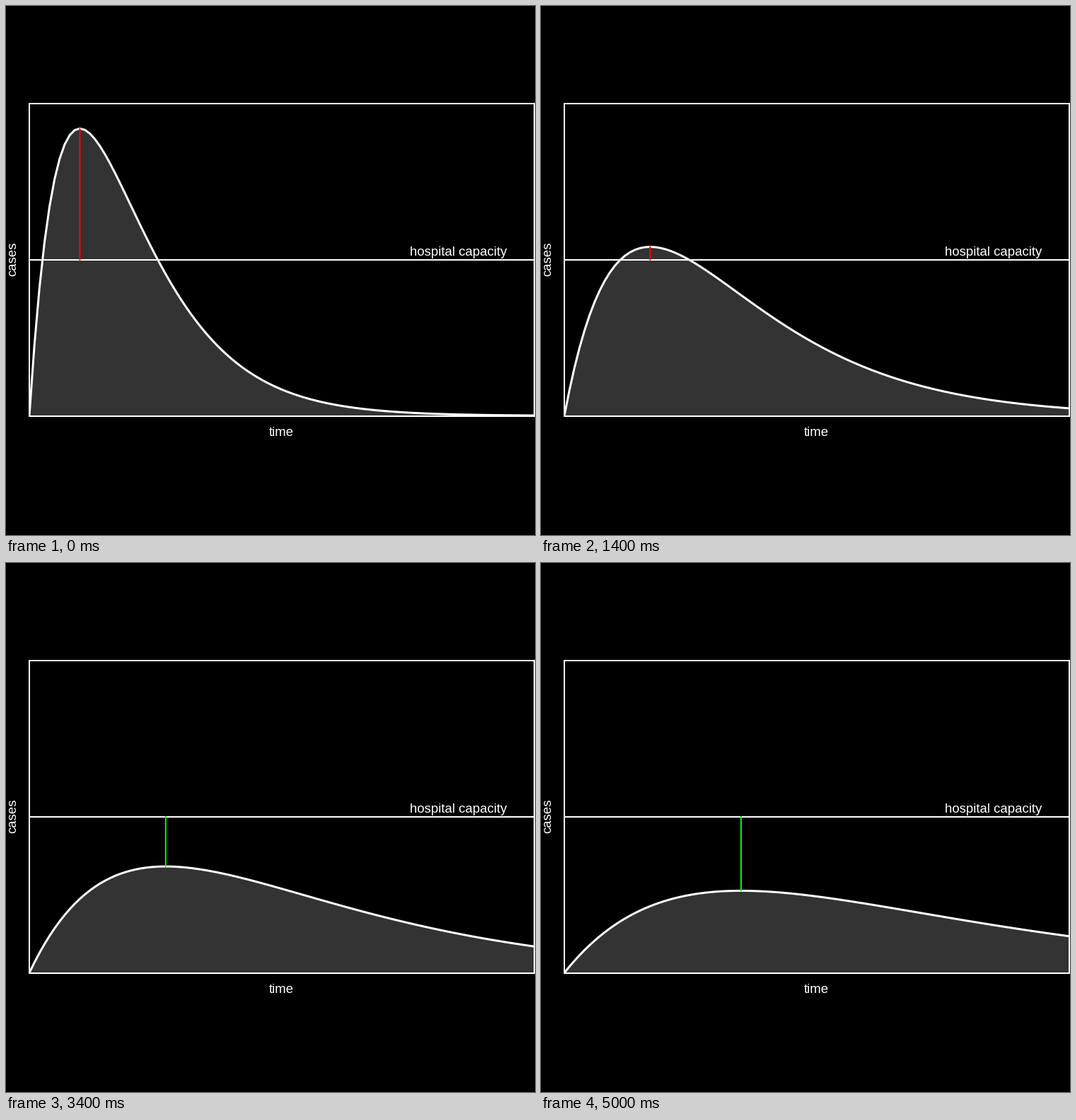
Animation of 748x748 px, one loop 5.1 s. Source, as a matplotlib script:

```python
import numpy as np
import matplotlib.pyplot as plt
from matplotlib.animation import FuncAnimation
from matplotlib.patches import Polygon, Rectangle

SIZE, DPI = 748, 64
FRAMES, INTERVAL = 51, 100
LEFT, RIGHT, TOP, BOTTOM = 33, 747, 138, 580
BASE, HEIGHT = 579.5, 441.7
T_MAX, Y_MAX, CAPACITY = 20, 0.2, 0.1
PX = 72 / DPI  # points per pixel

plt.rcParams["font.family"] = "Liberation Sans"
t = np.linspace(0, T_MAX, 101)


def density(t, scale):
    """Gamma density with shape 2; it peaks at t = scale."""
    return t / scale**2 * np.exp(-t / scale)


def to_x(t):
    return LEFT + t / T_MAX * (RIGHT - LEFT)


def to_y(v):
    return BASE - v / Y_MAX * HEIGHT


fig = plt.figure(figsize=(SIZE / DPI, SIZE / DPI), dpi=DPI, facecolor="black")
ax = fig.add_axes([0, 0, 1, 1])
ax.set_xlim(0, SIZE)
ax.set_ylim(SIZE, 0)
ax.axis("off")


def label(x, y, text, **kw):
    ax.text(x, y, text, color="white", fontsize=18.6 * PX, zorder=6, **kw)


plot_area = Rectangle((LEFT, TOP), RIGHT - LEFT, BOTTOM - TOP,
                      fill=False, ec="white", lw=2 * PX, snap=True, zorder=3)
ax.add_patch(plot_area)
ax.plot([LEFT, RIGHT], [359, 359], color="white", lw=2 * PX, zorder=3,
        solid_capstyle="butt")

label(639.5, 353, "hospital capacity", ha="center", va="baseline")
label(389.5, 608, "time", ha="center", va="baseline")
label(18, 358, "cases", ha="right", va="center", rotation=90)

area = Polygon([[LEFT, BASE], [RIGHT, BASE]], closed=True, fc="#333333",
               ec="none", zorder=1)
ax.add_patch(area)
curve, = ax.plot([], [], color="white", lw=3 * PX, zorder=4,
                 solid_capstyle="round", solid_joinstyle="round")
curve.set_clip_path(plot_area)
gap, = ax.plot([], [], lw=2 * PX, zorder=5, solid_capstyle="round", snap=False)


def update(i):
    scale = 2 + 0.1 * i
    x, y = to_x(t), to_y(density(t, scale))
    curve.set_data(x, y)
    outline = np.column_stack([x, y])
    area.set_xy(np.vstack([outline, [RIGHT, BASE], [LEFT, BASE]]))

    peak = density(scale, scale)
    gap.set_data([to_x(scale)] * 2, [to_y(CAPACITY), to_y(peak)])
    gap.set_color("#ff0000" if peak > CAPACITY else "#00ff00")
    return area, curve, gap


anim = FuncAnimation(fig, update, frames=FRAMES, interval=INTERVAL,
                     repeat=True, repeat_delay=0)
plt.show()
```
